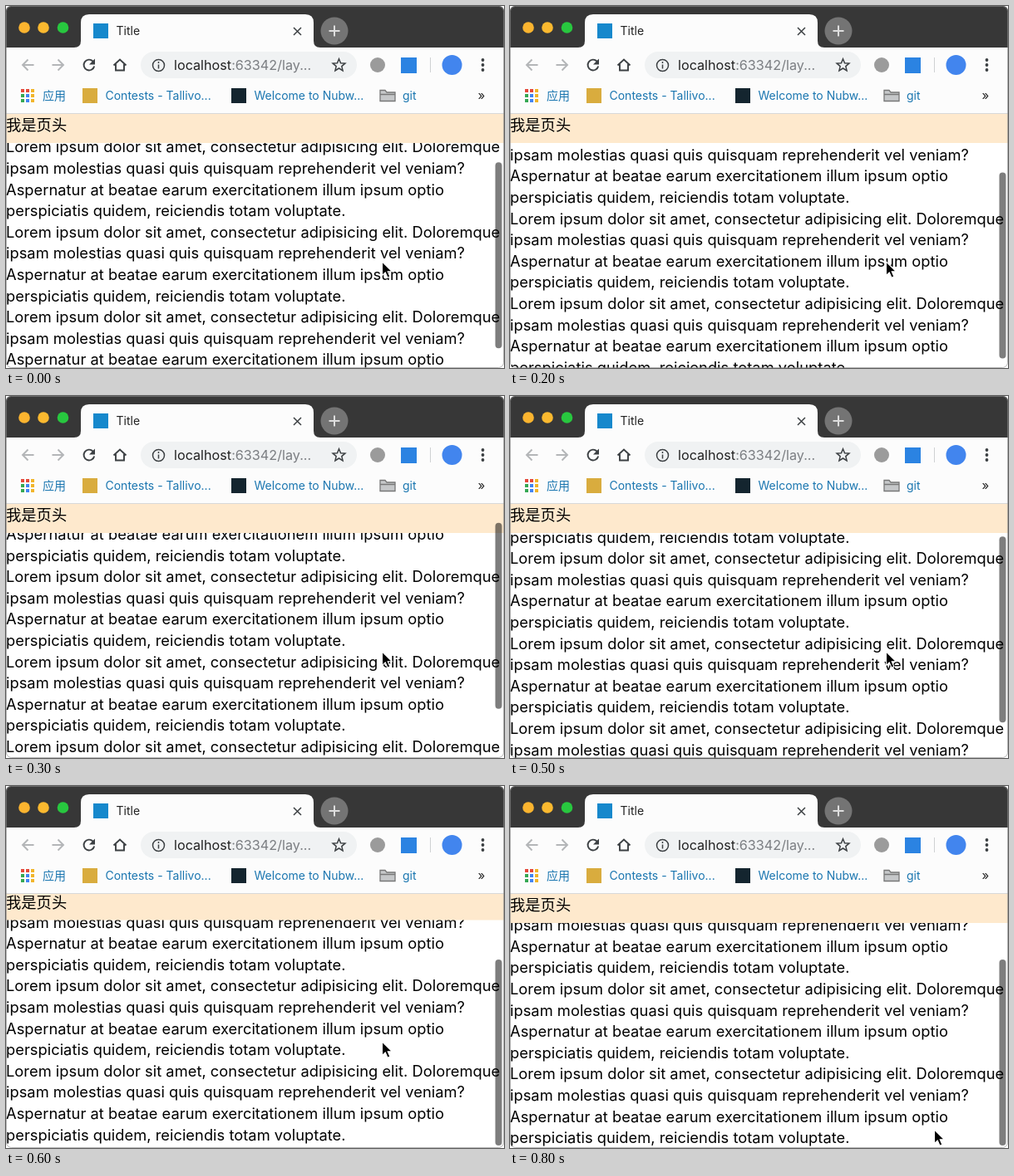
Recreate the animation shown at these times as an HTML page. Size 599 by 436 pixels, loop 0.9 s.

```html
<!DOCTYPE html>
<html lang="en">
<head>
<meta charset="utf-8">
<title>Fixed header</title>
<style>
  html, body { margin: 0; width: 100%; height: 100%; overflow: hidden; background: #fff; }
  svg { display: block; width: 599px; height: 436px; }
  text { font-family: Inter, "Noto Sans CJK SC", "Noto Sans CJK", sans-serif; white-space: pre; }
  .bookmark { font-size: 14px; fill: #1a76b0; }
  .page { font-size: 18.3px; letter-spacing: .03px; fill: #000; }
  .icon { fill: none; stroke: #3c4043; stroke-width: 1.9; }
  .thin { stroke-width: 1.5; }
  .off { stroke: #b4b6b8; }
</style>
</head>
<body>
<svg viewBox="0 0 599 436">
  <defs>
    <clipPath id="window"><rect width="599" height="436" rx="6"/></clipPath>
    <clipPath id="viewport"><rect y="130" width="599" height="306"/></clipPath>
  </defs>
  <g clip-path="url(#window)">
    <!-- Tab strip -->
    <rect width="599" height="50" fill="#373737"/>
    <circle cx="22" cy="26" r="6.8" fill="#fbb42f"/>
    <circle cx="45" cy="26" r="6.8" fill="#fbb92f"/>
    <circle cx="68.5" cy="26" r="6.8" fill="#28c73f"/>
    <path d="M82 50q8 0 8-8V20q0-10 10-10H360q10 0 10 10V42q0 8 8 8Z" fill="#fcfcfc"/>
    <rect x="105" y="21" width="18" height="18" fill="#1688cc"/>
    <text x="132.5" y="35" font-size="14" fill="#222">Title</text>
    <path class="icon thin" d="M346 26l9 9m0-9l-9 9"/>
    <circle cx="395" cy="30" r="16.5" fill="#747474"/>
    <path d="M388.5 30h13m-6.500-6.500v13" stroke="#dedede" stroke-width="2"/>

    <!-- Toolbar -->
    <rect y="50" width="599" height="80" fill="#fcfcfc"/>
    <path class="icon off" d="M33.5 71H20m6.500-6.500L20 71l6.500 6.500"/>
    <path class="icon off" d="M55.5 71H69m-6.500-6.500L69 71l-6.500 6.500"/>
    <path class="icon" d="M104.5 66.5a6.400 6.400 0 1 0 1.700 6"/>
    <path d="M107 63.5v7h-7z" fill="#3c4043"/>
    <path class="icon" d="M129.5 71.5l7.500-7 7.500 7M132 70v7.500h10V70"/>
    <rect x="162" y="55" width="260" height="32" rx="16" fill="#f0f2f3"/>
    <g class="icon thin">
      <circle cx="183.5" cy="71.5" r="7"/>
      <path d="M183.5 70.5v5m0-8.500v2"/>
    </g>
    <text x="202" y="77" font-size="16.2" fill="#222">localhost<tspan fill="#7b7e82">:63342/lay...</tspan></text>
    <path id="star" class="icon thin"/>
    <circle cx="447" cy="71" r="9" fill="#9b9b9b"/>
    <rect x="475" y="62" width="19" height="19" fill="#2b83e2"/>
    <path d="M510.5 62v18" stroke="#cfd1d3"/>
    <circle cx="536.5" cy="71" r="12" fill="#4285ee"/>
    <g fill="#3c4043">
      <circle cx="573.5" cy="65" r="1.9"/>
      <circle cx="573.5" cy="71" r="1.9"/>
      <circle cx="573.5" cy="77" r="1.9"/>
    </g>

    <!-- Bookmarks -->
    <g id="apps"></g>
    <text class="bookmark" x="44" y="113">应用</text>
    <rect x="92" y="99" width="18" height="18" fill="#d9ac3e"/>
    <text class="bookmark" x="119.5" y="113">Contests - Tallivo...</text>
    <rect x="271" y="99" width="18" height="18" fill="#14252f"/>
    <text class="bookmark" x="298.5" y="113">Welcome to Nubw...</text>
    <path d="M450 114.5V101.5h6l2 2.500h10v10.500ZM450 106.5h18" fill="#c6c8ca" stroke="#777" stroke-width="1.3"/>
    <text class="bookmark" x="477" y="113">git</text>
    <text x="567.5" y="113" font-size="15" fill="#222">»</text>

    <!-- Page -->
    <g clip-path="url(#viewport)">
      <rect y="130" width="599" height="306" fill="#fff"/>
      <g id="content"></g>
      <g id="header">
        <rect y="130" width="599" height="35" fill="#fee9cd"/>
        <text class="page" y="150.3">我是页头</text>
      </g>
      <rect id="thumb" x="588.5" width="8" height="224" rx="4" fill="#000" fill-opacity=".51"/>
    </g>
    <path d="M0 129.5H599" stroke="#d8d8d8"/>
    <path id="cursor" d="M0 0V16.5l3.800-3.600 2.700 6.300 2.900-1.200-2.700-6.200h5.200Z" fill="#000" stroke="#fff" stroke-width="1.1"/>
  </g>
  <rect x=".5" y=".5" width="598" height="435" rx="6" fill="none" stroke="#888" stroke-opacity=".6"/>
</svg>
<script>
const $ = id => document.getElementById(id);
const LINE_HEIGHT = 25.6, MAX_SCROLL = 103.6;
const STEP = 100;

function add(parent, tag, attributes, text = '') {
  const node = document.createElementNS('http://www.w3.org/2000/svg', tag);
  for (const name in attributes) node.setAttribute(name, attributes[name]);
  node.textContent = text;
  parent.append(node);
}

const paragraph = [
  'Lorem ipsum dolor sit amet, consectetur adipisicing elit. Doloremque',
  'ipsam molestias quasi quis quisquam reprehenderit vel veniam?',
  'Aspernatur at beatae earum exercitationem illum ipsum optio',
  'perspiciatis quidem, reiciendis totam voluptate.'
];
for (let i = 0; i < 16; i++) {
  add($('content'), 'text', { class: 'page', y: 149.8 + i * LINE_HEIGHT }, paragraph[i % 4]);
}

const appColors = ['#e5493a', '#e5493a', '#f2b52b', '#35a853', '#4285f4', '#f2b52b', '#35a853', '#4285f4', '#f2b52b'];
appColors.forEach((fill, i) => add($('apps'), 'rect', {
  x: 18 + i % 3 * 6, y: 100 + Math.floor(i / 3) * 6, width: 4, height: 4, fill
}));

const starPoints = Array.from({ length: 10 }, (_, i) => {
  const radius = i % 2 ? 3.5 : 7.8, angle = (i / 5 - 0.5) * Math.PI;
  return [400.5 + radius * Math.cos(angle), 71.5 + radius * Math.sin(angle)];
});
$('star').setAttribute('d', `M${starPoints.join('L')}Z`);

// Down to the end, up to the top, down again with a rubber-band bounce.
const scrolls = [75.7, MAX_SCROLL, 92, 28, 0, 50, 107.1, 104.6, MAX_SCROLL];

function draw(time) {
  const step = Math.floor(time / STEP) % scrolls.length;
  const scroll = scrolls[step];
  const inRange = Math.min(scroll, MAX_SCROLL);
  // The pointer leaves only once the page has settled.
  const pointer = step === scrolls.length - 1 ? [510.5, 414] : [452.5, 308];
  $('content').setAttribute('transform', `translate(0 ${-scroll})`);
  $('header').setAttribute('transform', `translate(0 ${inRange - scroll})`);
  $('thumb').setAttribute('y', 132 + inRange / MAX_SCROLL * 77);
  $('cursor').setAttribute('transform', `translate(${pointer})`);
}

const start = performance.now();
function tick() {
  draw(performance.now() - start);
  requestAnimationFrame(tick);
}
tick();
</script>
</body>
</html>
```
